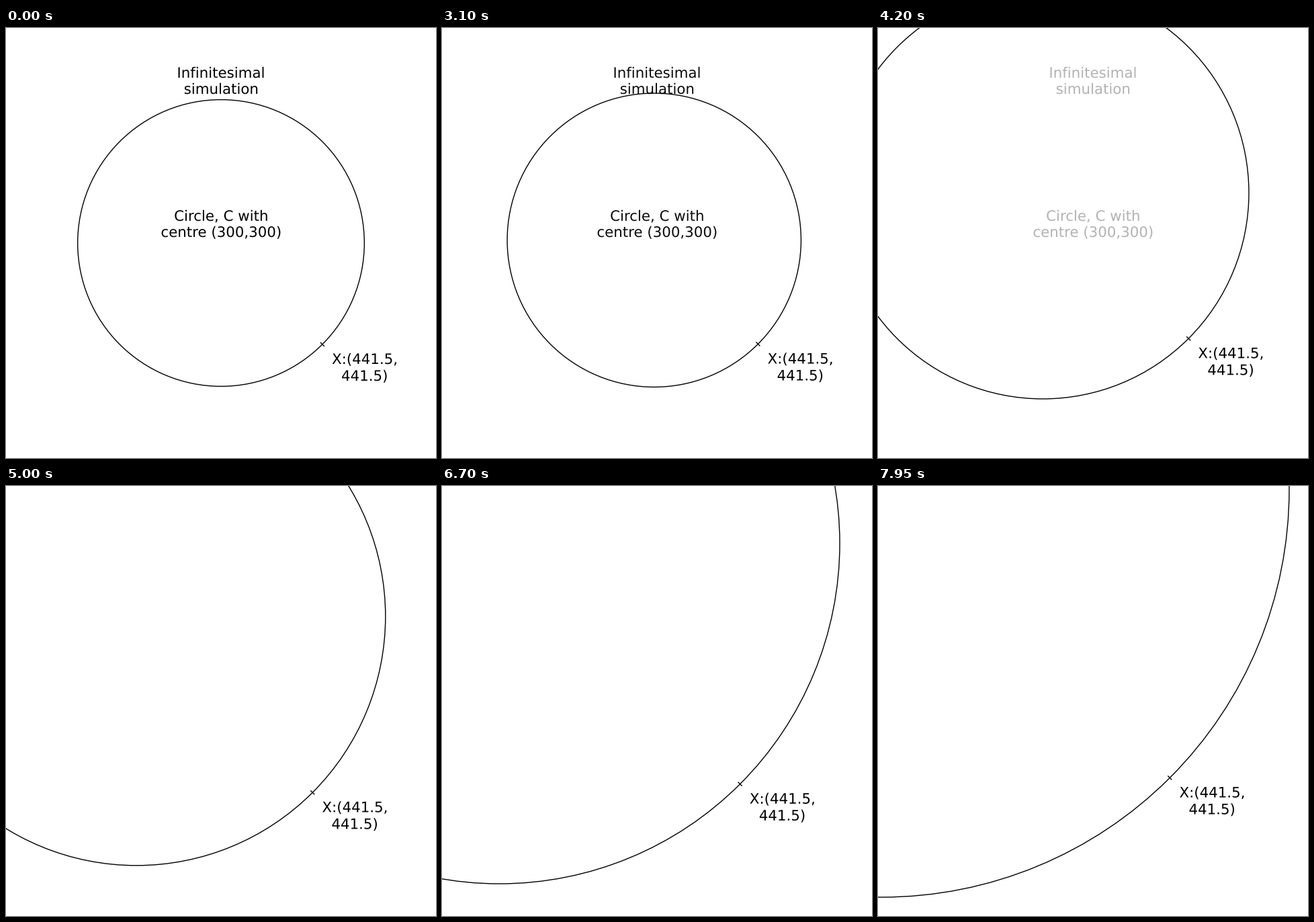
Animation of 640 by 640 pixels, one loop 8000 ms. Source, as a matplotlib script:

```python
import matplotlib.pyplot as plt
from matplotlib.animation import FuncAnimation
from matplotlib.patches import Circle, PathPatch
from matplotlib.textpath import TextPath
from matplotlib.transforms import Affine2D

SIZE, DPI = 640, 100
UNIT = SIZE / 600            # drawing units to pixels
STEP, LOOP = 50, 8000        # ms
HOLD, START = 3100, 3033.3   # still until HOLD, then timed from START
FADE = 1667                  # ms for the fixed captions to vanish
LINE = 1.4 * 72 / DPI
FONT = 20 * UNIT
DIAG = 0.5 ** 0.5
R0, C0 = 200 * UNIT, 300 * UNIT
R_RATE, C_RATE = 0.075 * UNIT, -0.06 * UNIT   # px per ms

fig = plt.figure(figsize=(SIZE / DPI, SIZE / DPI), dpi=DPI, facecolor="white")
ax = fig.add_axes([0, 0, 1, 1])
ax.set_xlim(0, SIZE)
ax.set_ylim(SIZE, 0)
ax.axis("off")


def add_line(text, cx, base):
    """Add one line of text centred on cx; return its patch and position."""
    path = TextPath((0, 0), text, size=FONT, prop={"family": "DejaVu Sans"})
    box = path.get_extents()
    patch = PathPatch(path, fc="black", lw=0, zorder=3)
    ax.add_patch(patch)
    x = cx - (box.x0 + box.x1) / 2
    place(patch, x, base)
    return patch, x, base


def place(patch, x, y):
    patch.set_transform(Affine2D().scale(1, -1).translate(x, y) + ax.transData)


def add_block(lines, cx, y):
    return [add_line(s, cx * UNIT, round((y + 23 * i) * UNIT))
            for i, s in enumerate(lines)]


captions = (add_block(["Infinitesimal", "simulation"], 300, 69)
            + add_block(["Circle, C with", "centre (300,300)"], 300, 269))
label = add_block(["X:(441.5,", "441.5)"], 500, 469)

circle = Circle((C0, C0), R0, fill=False, ec="black", lw=LINE)
ax.add_patch(circle)
tick, = ax.plot([], [], color="black", lw=LINE, solid_capstyle="butt")


def draw(frame):
    t = frame * STEP
    tau = t - START if t >= HOLD else 0
    c, r = C0 + C_RATE * tau, R0 + R_RATE * tau
    circle.set_center((c, c))
    circle.set_radius(r)

    # the point stays on the circle's lower-right diagonal
    p = c + r * DIAG
    tick.set_data([p - 3, p + 3], [p - 3, p + 3])
    shift = p - (C0 + R0 * DIAG)
    for patch, x, y in label:
        place(patch, x + shift, y + shift)

    alpha = max(0, 1 - tau / FADE)
    for patch, _, _ in captions:
        patch.set_alpha(alpha)
    return [circle, tick]


anim = FuncAnimation(fig, draw, frames=LOOP // STEP, interval=STEP,
                     repeat=True, repeat_delay=0, blit=False)
plt.show()
```
